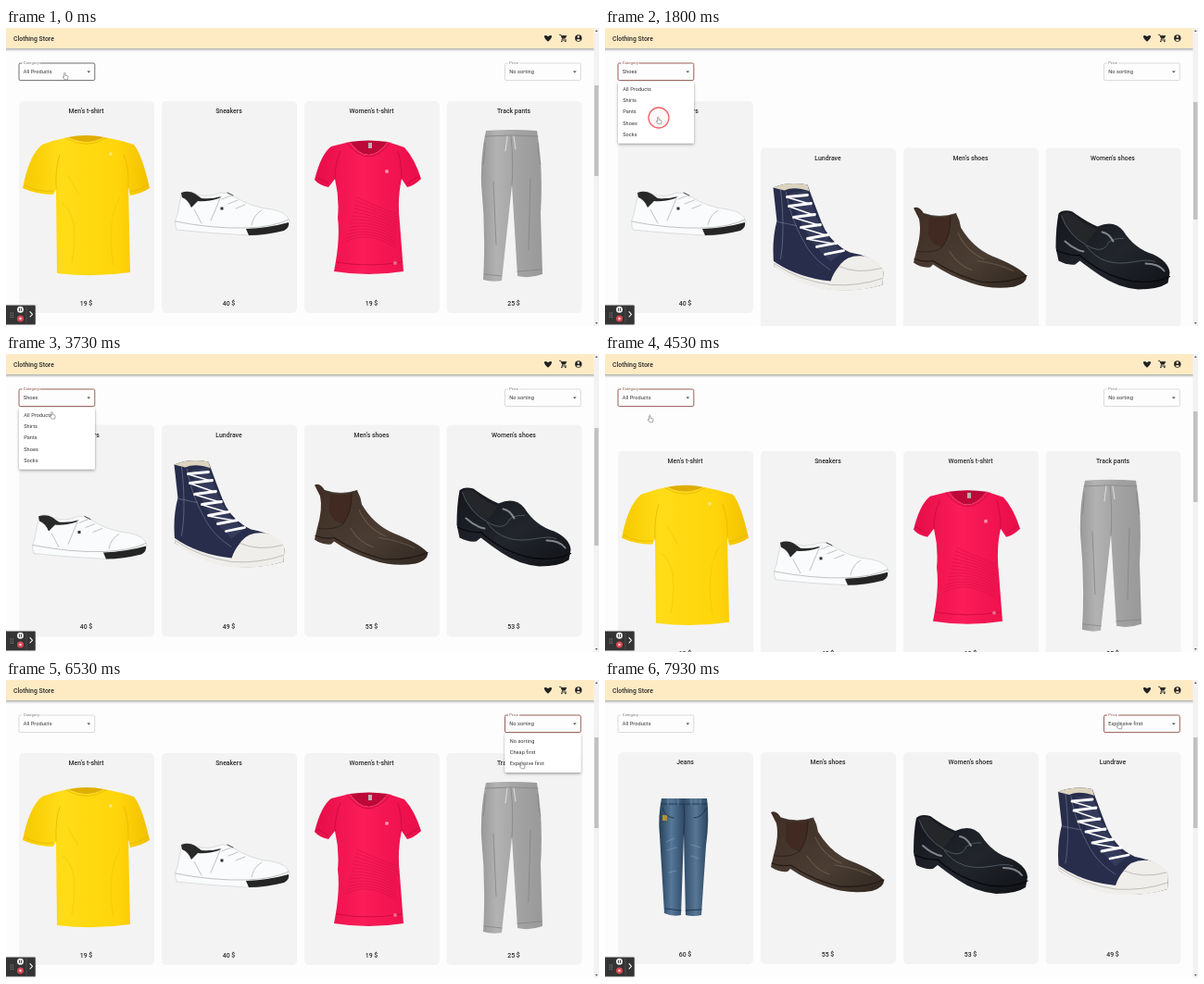
An HTML page that plays this animation: 640 by 322 pixels, repeating every 8000 ms.

```html
<!DOCTYPE html>
<html lang="en">
<head>
<meta charset="utf-8">
<title>Clothing Store</title>
<style>
html, body { margin: 0; width: 100%; height: 100%; overflow: hidden; background: #fdfdfd; }
svg { display: block; width: 100%; height: 100%; }
text { font: 5.6px Roboto, Arial, sans-serif; letter-spacing: .01em; fill: #333; }
.title { font-size: 6.9px; font-weight: 500; letter-spacing: 0; fill: #292929; }
.label { font-size: 4.2px; fill: #777; }
.mid { text-anchor: middle; }
.line { fill: none; stroke-linecap: round; stroke-linejoin: round; }
</style>
</head>
<body>
<svg id="stage" viewBox="0 0 640 322" preserveAspectRatio="none">
<defs>
  <filter id="shadow" x="-20%" y="-20%" width="140%" height="150%">
    <feDropShadow dx="0" dy="1.2" stdDeviation="1.5" flood-opacity=".4"/>
  </filter>
  <linearGradient id="yellow"><stop stop-color="#f6c900"/><stop offset=".3" stop-color="#ffdc18"/><stop offset=".75" stop-color="#ffd50a"/><stop offset="1" stop-color="#f2c000"/></linearGradient>
  <linearGradient id="pink"><stop stop-color="#e60d49"/><stop offset=".45" stop-color="#fb1c58"/><stop offset="1" stop-color="#e90d49"/></linearGradient>
  <linearGradient id="grey"><stop stop-color="#999"/><stop offset=".25" stop-color="#b2b2b2"/><stop offset=".6" stop-color="#a3a3a3"/><stop offset="1" stop-color="#999"/></linearGradient>
  <linearGradient id="denim"><stop stop-color="#263f58"/><stop offset=".25" stop-color="#56789a"/><stop offset=".5" stop-color="#304b68"/><stop offset=".75" stop-color="#587896"/><stop offset="1" stop-color="#29435c"/></linearGradient>
  <linearGradient id="brown" x2="1" y2="1"><stop stop-color="#3f2e25"/><stop offset=".6" stop-color="#4a3d33"/><stop offset="1" stop-color="#302720"/></linearGradient>
  <linearGradient id="black" x2="1" y2="1"><stop stop-color="#14161c"/><stop offset=".55" stop-color="#22252c"/><stop offset="1" stop-color="#101216"/></linearGradient>

  <g id="tee">
    <path fill="url(#yellow)" d="M67 118Q87 128 106 118Q123 121 138 126Q147 137 155 173Q146 179 134 181L132 172L134 264Q95 270 55 265L54 174L51 180Q33 180 18 173Q25 137 39 126Q52 121 67 118Z"/>
    <path fill="#dfae00" d="M67 118Q87 114 106 118Q87 128 67 118Z"/>
    <path class="line" stroke="#e6b800" stroke-width=".8" d="M65 119Q87 132 108 119M54 174Q53 151 58 137M132 172Q133 151 127 137M20 170Q35 178 51 176M153 169Q145 175 134 177"/>
    <path class="line" stroke="#e8bc00" stroke-width="1.2" opacity=".35" d="M61 190Q80 203 71 254M123 182Q108 211 116 256M67 160L78 179"/>
    <circle cx="113" cy="136" r="1.8" fill="#f6e68c"/>
  </g>

  <g id="sneaker">
    <path fill="#f9fbfc" stroke="#c9c9c9" stroke-width=".6" d="M190 178Q194 175 200 177Q211 184 226 180Q233 176 243 180Q264 194 287 196Q304 199 306 209L304 216Q283 224 262 224Q220 222 184 218Q181 209 185 202Q187 190 190 178Z"/>
    <path fill="#292929" d="M189 178Q197 175 204 179L211 184Q222 185 232 182L230 184Q217 188 207 187L200 194Q197 186 190 183Z"/>
    <path fill="#252525" d="M259 217Q284 216 305 210Q306 216 300 219Q280 224 262 224Z"/>
    <path class="line" stroke="#444" stroke-width="1" d="M239 178L245 181"/>
    <path class="line" stroke="#aaa" stroke-width=".7" d="M183 209Q223 217 259 216Q289 215 305 207M203 196L211 211M232 182L221 208M243 181L233 185M250 186L240 190M258 191L248 195M276 197Q267 202 265 213"/>
    <path fill="#333" d="M231.5 193.5h3v3h-3z"/>
  </g>

  <g id="fitted">
    <path fill="url(#pink)" d="M371 123Q391 151 412 123L430 129Q441 141 448 163Q441 170 433 172L427 163Q422 185 425 211L429 263Q391 269 354 263Q361 227 358 205Q360 184 355 163L348 172Q338 170 333 164Q340 136 351 128Z"/>
    <path fill="#bd0839" d="M371 123Q391 120 412 123Q391 151 371 123Z"/>
    <path class="line" stroke="#c60a40" stroke-width=".8" d="M368 124Q391 154 415 124M355 163Q355 145 361 133M427 163Q427 145 423 133M335 161L348 168M446 160L433 168M357 253Q391 259 427 253"/>
    <g id="weave" class="line" stroke="#ca0e43" stroke-width=".7" opacity=".65"></g>
    <path fill="#b9afb0" d="M391 124h4v6h-4z"/>
    <circle cx="411" cy="155" r="2" fill="#f990a7"/><circle cx="420" cy="254" r="2" fill="#e96b88"/>
  </g>

  <g id="pants">
    <path fill="url(#grey)" d="M518 111Q545 109 573 111Q580 151 577 200L579 266Q565 271 552 268L546 170L535 273Q525 275 515 272Q518 220 513 169Q512 138 518 111Z"/>
    <path class="line" stroke="#858585" stroke-width=".8" d="M517 117Q545 115 574 117M545 117Q548 145 546 170M517 124Q517 139 515 147M574 124Q574 139 577 147M516 266L535 268M552 263L578 261M526 166L529 234M566 162L564 240"/>
    <path class="line" stroke="#dedede" stroke-width="1" d="M541 117L539 133M548 117L550 131"/>
  </g>

  <g id="jeans">
    <path fill="url(#denim)" d="M61 128H110Q113 150 109 179L104 254Q95 256 87 254L85 167L82 254Q73 256 64 252L59 168Q57 148 61 128Z"/>
    <path class="line" stroke="#1e344c" stroke-width=".9" d="M61 134H110M85 134Q87 150 85 167M62 138Q64 148 74 149M109 138Q106 148 96 149M65 247L82 249M87 249L104 248"/>
    <path class="line" stroke="#91a9bb" stroke-width=".5" d="M68 128v7M79 128v7M93 128v7M103 128v7M66 175l9-4M67 184l10-3M93 178l10 3M93 190l8 3M69 208l8-2"/>
    <path fill="#b68c38" d="M62 146h5v6h-5z"/>
  </g>

  <g id="boot">
    <path fill="url(#brown)" d="M179 143Q185 140 190 149Q207 155 225 149Q229 156 230 164Q243 186 264 195Q292 206 301 216Q302 224 288 228Q264 232 241 224Q217 216 200 204L197 207Q187 208 179 202L182 189Q188 169 185 155Z"/>
    <path fill="#402a21" d="M196 153Q208 155 219 152Q221 170 210 185Q199 184 195 172Z"/>
    <path class="line" stroke="#211914" stroke-width="1.2" d="M180 198Q191 202 200 200Q226 217 253 223Q280 225 301 216"/>
    <path class="line" stroke="#261c16" stroke-width=".7" d="M190 149Q207 155 225 149M210 185Q203 192 183 190M219 152Q219 174 210 185"/>
    <path class="line" stroke="#80705f" stroke-width="1.2" opacity=".5" d="M227 170Q236 190 255 198M248 200Q270 203 287 211M218 190Q227 205 242 210"/>
  </g>

  <g id="loafer">
    <path fill="url(#black)" d="M336 149Q341 144 351 147Q366 158 378 163Q396 155 406 168Q418 187 438 193Q455 201 456 213L454 224Q444 231 422 231Q400 229 381 216Q369 208 359 200L354 204Q345 205 336 200L333 186Q333 164 336 149Z"/>
    <path fill="#25262a" d="M339 149Q345 146 351 149Q361 160 378 166Q369 176 365 183Q344 171 339 149Z"/>
    <path class="line" stroke="#07080b" stroke-width="1.3" d="M334 189Q348 195 359 194Q383 216 415 222Q440 225 456 217"/>
    <path class="line" stroke="#596170" stroke-width=".8" d="M339 151Q346 172 366 183Q384 194 390 180Q397 175 406 176M366 184Q383 208 418 201Q434 198 440 201"/>
    <path class="line" stroke="#b8bdc5" stroke-width="2" opacity=".65" d="M383 169Q390 170 395 179M430 203Q444 203 450 211M343 179Q353 188 363 190"/>
  </g>

  <g id="hightop">
    <path fill="#272d4b" d="M489 121Q506 114 526 118Q534 140 541 158Q550 181 572 191Q601 196 608 212L607 226Q577 235 543 230Q516 224 490 206Q487 179 493 157Z"/>
    <path fill="#ddd4bf" d="M489 121Q506 114 526 118L528 125Q512 119 501 124Z"/>
    <path fill="#f0eeea" d="M560 206Q568 193 587 195Q605 199 608 212L607 226Q579 235 545 231Q514 225 490 206L489 200Q514 218 551 222Q554 213 560 206Z"/>
    <path class="line" stroke="#aaa8a5" stroke-width=".7" d="M490 203Q516 221 551 226Q581 228 607 219M560 206Q580 215 606 208"/>
    <path class="line" stroke="#8b91a5" stroke-width=".6" stroke-dasharray="1 1" d="M503 126Q508 155 523 181Q532 198 551 210M494 158L514 162M497 123Q502 167 497 198"/>
    <path fill="#343a59" d="M508 127L526 124Q533 152 549 177L564 191L551 201Q520 174 508 127Z"/>
    <path class="line" stroke="#fff" stroke-width="2.8" d="M504 131L526 129M506 141L530 138M511 153L534 150M519 164L540 161M526 176L548 172M536 185L557 181M545 193L565 189"/>
    <path class="line" stroke="#fff" stroke-width="1.5" d="M506 132L530 139M508 142L534 151M513 154L540 162M521 165L548 173M528 177L557 182"/>
  </g>
</defs>
<rect width="640" height="322" fill="#fdfdfd"/>
<g id="scenes"></g>
<g id="controls"></g>
<g id="menus"></g>

<g>
  <rect x="-5" y="-5" width="645" height="27" fill="#feebc4" filter="url(#shadow)"/>
  <text class="title" x="8" y="13.6">Clothing Store</text>
  <g fill="#222">
    <path d="M585 14.7C578 9 581.5 6.3 585 9.3C588.5 6.3 592 9 585 14.7Z"/>
    <path stroke="#222" stroke-width=".5" d="M599.2 8.3h5.8l-1.6 3h-2.8z"/>
    <path class="line" stroke="#222" stroke-width=".9" d="M597.5 7.3h1.2l2 4.2l-.8 1.5h4.8"/>
    <circle cx="599.8" cy="14.4" r=".8"/><circle cx="603.8" cy="14.4" r=".8"/>
    <circle cx="617.8" cy="11" r="3.7"/>
  </g>
  <circle cx="617.8" cy="9.5" r="1.2" fill="#feebc4"/><path d="M615.4 12.9q2.4-1.8 4.8 0q-2.4 2.3-4.8 0" fill="#feebc4"/>
</g>
<rect x="634.5" width="5.5" height="322" fill="#f2f2f2"/>
<rect id="thumb" x="635" width="4.5" fill="#c1c1c1"/>
<path fill="#666" d="M635.8 4h3l-1.5-2zM635.8 318h3l-1.5 2z"/>

<g>
  <rect x="-1" y="299.3" width="33" height="21.4" rx="1.5" fill="#343434" stroke="#c4c4c4" stroke-width=".7"/>
  <path stroke="#999" stroke-width="1" stroke-dasharray="1 1.2" d="M5.2 307.5v6M7.4 307.5v6"/>
  <path stroke="#666" stroke-width=".5" d="M22 301v18"/>
  <circle cx="15.5" cy="304.3" r="3.5" fill="#eee"/><path stroke="#333" stroke-width=".9" d="M14.5 302.7v3.2M16.5 302.7v3.2"/>
  <circle cx="15.5" cy="314" r="3.5" fill="#dc4653"/><circle cx="15.5" cy="314" r="1.3" fill="#f3d5d7"/>
  <path class="line" stroke="#fff" stroke-width="1.1" d="M26 306.6l2.5 2.7l-2.5 2.7"/>
</g>
<circle id="ring" fill="#e5484d" fill-opacity=".04" stroke="#ec666a" stroke-width="1.3"/>
<path id="cursor" fill="#fff" stroke="#666" stroke-width=".6" stroke-linejoin="round" d="M-1.3 1V-3.3Q-.6-4.5 .1-3.3V-.8L2.2-.4Q3.2 0 3 1.3L2.5 3.8H-.7L-2.8 1.1Q-2.7 0-1.3 1Z"/>
</svg>
<script>
const $ = id => document.getElementById(id);
const clamp = x => Math.max(0, Math.min(1, x));
const easeOut = x => 1 - (1 - clamp(x)) ** 3;
const smooth = x => x * x * (3 - 2 * x);
const LOOP = 8000, SLOTS = [14, 168, 322, 475.5], FOCUS = "#8a5046";

// Each drawing keeps the slot and card top it was laid out for.
const products = {
  tee: ["Men's t-shirt", 19, 0, 79], sneaker: ["Sneakers", 40, 1, 79],
  fitted: ["Women's t-shirt", 19, 2, 79], pants: ["Track pants", 25, 3, 79],
  jeans: ["Jeans", 60, 0, 78], boot: ["Men's shoes", 55, 1, 78],
  loafer: ["Women's shoes", 53, 2, 78], hightop: ["Lundrave", 49, 3, 78]
};
const allItems = ["tee", "sneaker", "fitted", "pants"];
const scenes = [
  { start: -2000, top: 79, items: allItems },
  { start: 1640, top: 76.5, items: ["sneaker", "hightop", "boot", "loafer"], keep: "sneaker" },
  { start: 4234, top: 79, items: allItems },
  { start: 6750, top: 78, items: ["jeans", "boot", "loafer", "hightop"] }
];
const categories = ["All Products", "Shirts", "Pants", "Shoes", "Socks"];
const menus = [
  { x: 14, open: 600, pick: 1640, options: categories },
  { x: 14, open: 3050, pick: 4234, options: categories },
  { x: 538.5, open: 5900, pick: 6750, options: ["No sorting", "Cheap first", "Expensive first"] }
];
const clicks = menus.flatMap(m => [m.open, m.pick]);
const cursorPath = [
  [0, 64, 52], [800, 64, 52], [1450, 58, 100], [1850, 58, 100], [2500, 54, 54],
  [3250, 54, 54], [3950, 49, 70], [4600, 49, 70], [5550, 562, 47], [6000, 562, 47],
  [6500, 557, 92], [6790, 557, 92], [7040, 554, 52], [7600, 555, 49], [8000, 555, 49]
];

function card(id, slot) {
  const [name, price, homeSlot, homeTop] = products[id], x = SLOTS[slot];
  return `<g><rect x="${x}" width="146" height="229" rx="5" fill="#f3f3f3"/>
    <text class="title mid" x="${x + 72.5}" y="13.4">${name}</text>
    <use href="#${id}" x="${x - SLOTS[homeSlot]}" y="${-homeTop}"/>
    <text class="title mid" x="${x + 72.5}" y="220.7">${price} $</text></g>`;
}

function select(id, x, label, notch) {
  return `<rect id="${id}Box" x="${x}" y="38" width="81.8" height="18.6" rx="1.5" fill="none"/>
    <rect x="${x + 3.5}" y="36" width="${notch}" height="4" fill="#fdfdfd"/>
    <text id="${id}Label" class="label" x="${x + 4.8}" y="39.3">${label}</text>
    <text id="${id}Value" x="${x + 4.8}" y="49.2"></text>
    <path d="M${x + 73.5} 46.5h3.6l-1.8 1.9z" fill="#444"/>`;
}

$("weave").innerHTML = Array.from({ length: 13 }, (_, i) =>
  `<path d="M${367 + i} ${231 - i * 4}Q${390 + i} ${218 - i * 2} ${420 + i * .2} ${237 - i * 3}"/>`).join("");
$("scenes").innerHTML = scenes.map(s => `<g>${s.items.map(card).join("")}</g>`).join("");
$("controls").innerHTML = select("category", 14, "Category", 19) + select("price", 538.5, "Price", 12);
$("menus").innerHTML = menus.map(({ x, options }) =>
  `<g><rect x="${x}" y="58" width="82" height="${options.length * 12.3 + 5}" rx="1.5" fill="#fff" filter="url(#shadow)"/>
  ${options.map((o, i) => `<text x="${x + 5.2}" y="${67.6 + i * 12.3}">${o}</text>`).join("")}</g>`).join("");

function cursorAt(t) {
  const i = cursorPath.findIndex(k => k[0] > t);
  const [t0, x0, y0] = cursorPath[i - 1], [t1, x1, y1] = cursorPath[i];
  const p = smooth((t - t0) / (t1 - t0));
  return [x0 + (x1 - x0) * p, y0 + (y1 - y0) * p];
}

function paintSelect(id, x, value, focused, [cx, cy]) {
  const hover = cx > x && cx < x + 82 && cy > 38 && cy < 57;
  const box = $(id + "Box");
  box.setAttribute("stroke", focused ? FOCUS : hover ? "#333" : "#ccc");
  box.setAttribute("stroke-width", focused ? .9 : .7);
  $(id + "Label").style.fill = focused ? FOCUS : "#777";
  $(id + "Value").textContent = value;
}

function draw(t) {
  const current = scenes.findLastIndex(s => t >= s.start);
  const cursor = cursorAt(t);
  scenes.forEach((scene, i) => {
    const group = $("scenes").children[i];
    group.style.display = i === current ? "" : "none";
    if (i !== current) return;
    const age = t - scene.start, left = 1 - easeOut(age / 800);
    scene.items.forEach((id, n) => {
      const kept = id === scene.keep, el = group.children[n];
      el.setAttribute("transform", `translate(0 ${scene.top + left * (kept ? 5 : 104)})`);
      el.setAttribute("opacity", kept ? 1 : clamp(age / 120));
    });
  });

  menus.forEach((m, i) => {
    const shown = Math.min(clamp((t - m.open - 60) / 180), 1 - clamp((t - m.pick - 175) / 100));
    $("menus").children[i].setAttribute("opacity", shown);
  });
  paintSelect("category", 14, current === 1 ? "Shoes" : "All Products", t >= 600 && t < 5900, cursor);
  paintSelect("price", 538.5, current === 3 ? "Expensive first" : "No sorting", t >= 5900, cursor);

  $("thumb").setAttribute("y", current === 1 ? 80 : 62);
  $("thumb").setAttribute("height", current === 1 ? 127 : 98);

  const since = t - (clicks.findLast(c => c <= t) ?? -LOOP);
  const ring = $("ring");
  ring.setAttribute("cx", cursor[0]);
  ring.setAttribute("cy", cursor[1] - 3);
  ring.setAttribute("r", 4 + 7 * easeOut(since / 150));
  ring.setAttribute("opacity", 1 - clamp((since - 170) / 110));
  $("cursor").setAttribute("transform", `translate(${cursor})`);
}

function tick() {
  draw(performance.now() % LOOP);
  requestAnimationFrame(tick);
}
tick();
</script>
</body>
</html>
```
